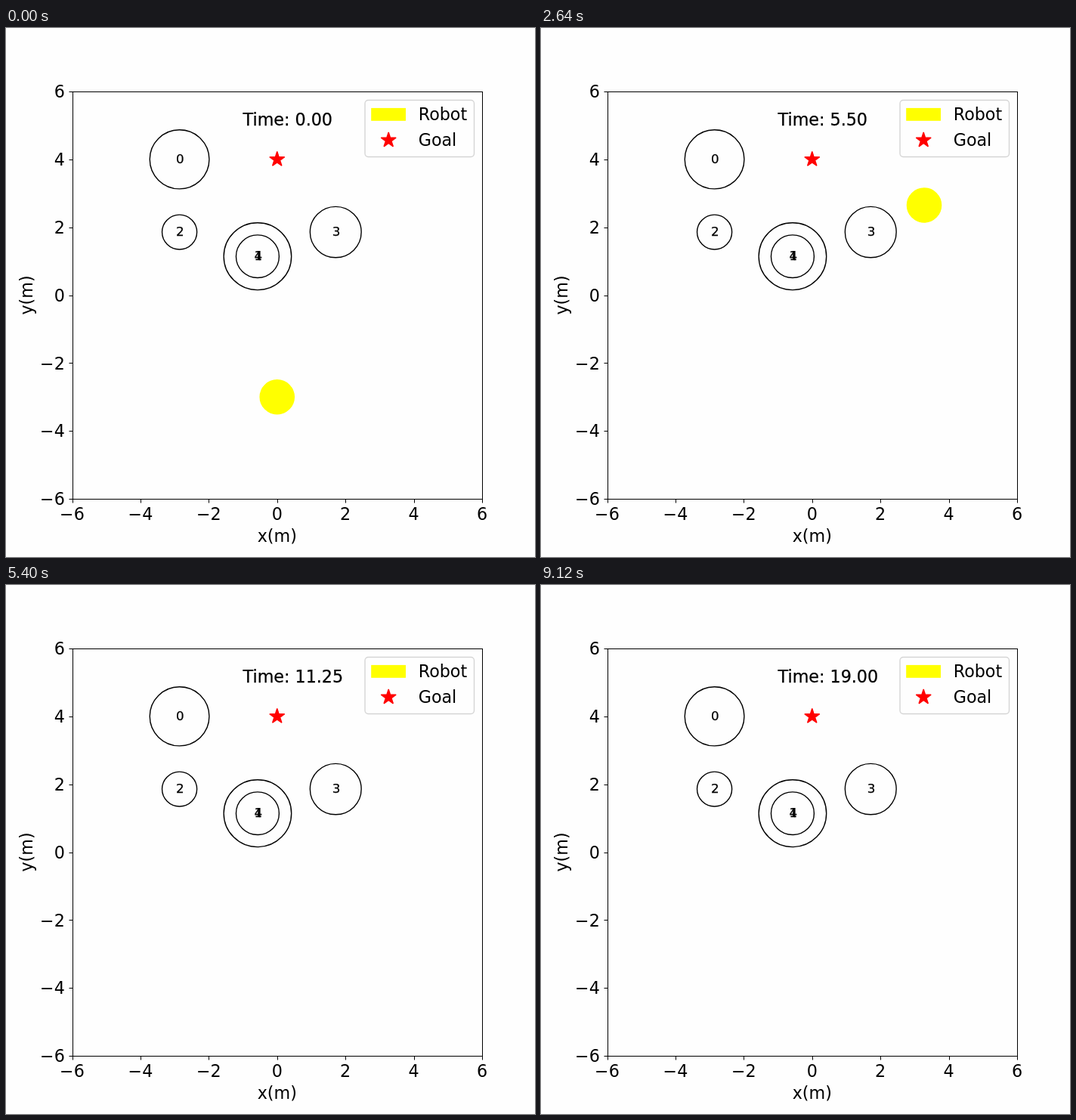
Animation of 700x700 px, one loop 9.24 s. Source, as an HTML page:

```html
<!DOCTYPE html>
<html lang="en">
<head>
<meta charset="utf-8">
<title>Robot path</title>
<style>
  html, body { margin: 0; width: 100%; height: 100%; overflow: hidden; background: #fefefe; }
  svg { display: block; width: 100vw; height: 100vh; }
  text { font: 22.22px "DejaVu Sans", sans-serif; white-space: pre; }
  .id { font-size: 16.67px; }
  .id, #clock { stroke: #000; stroke-width: .25; }
  .middle { text-anchor: middle; }
  .end { text-anchor: end; }
  .line { fill: none; stroke: #000; stroke-width: 1.39; }
  .axis { fill: none; stroke: #000; stroke-width: 1; }
  .yellow { fill: #ff0; stroke: #ff0; stroke-width: 1.39; }
  .star { fill: #f00; stroke: #f00; stroke-width: 1.39; stroke-linejoin: bevel; }
</style>
</head>
<body>
<svg viewBox="0 0 700 700">
  <clipPath id="area"><rect x="88" y="84" width="542" height="539"/></clipPath>
  <g clip-path="url(#area)"><ellipse id="robot" class="yellow" rx="22.6" ry="22.46"/></g>
  <g id="plot"></g>
  <text id="clock" x="313.6" y="129"></text>
  <g id="legend">
    <rect x="475" y="95.5" width="144.5" height="75" rx="4.4" fill="#fff" stroke="#ccc" stroke-width="1.39" opacity=".8"/>
    <rect class="yellow" x="483.9" y="106.6" width="44.4" height="15.5"/>
    <text x="545.7" y="122">Robot</text>
    <text x="545.7" y="156">Goal</text>
  </g>
</svg>
<script>
const STEP_MS = 120, STEPS = 77, STEP_TIME = 0.25;
const plot = document.getElementById('plot');
const robot = document.getElementById('robot');
const clock = document.getElementById('clock');
const SCALE_X = 542.5 / 12, SCALE_Y = 539 / 12;
const toX = x => 358.75 + x * SCALE_X;
const toY = y => 353.5 - y * SCALE_Y;

function add(parent, tag, attrs, text = '') {
  const node = document.createElementNS('http://www.w3.org/2000/svg', tag);
  for (const name in attrs) node.setAttribute(name, attrs[name]);
  node.textContent = text;
  parent.append(node);
}

function addStar(parent, x, y) {
  const points = Array.from({ length: 10 }, (_, i) => {
    const radius = i % 2 ? 3.98 : 10.42, angle = i * Math.PI / 5;
    return [x + radius * Math.sin(angle), y - radius * Math.cos(angle)];
  });
  add(parent, 'polygon', { class: 'star', points: points.join(' ') });
}

function drawPlot() {
  // Obstacles: x, y, radius in metres
  [
    [-20 / 7, 4, .87], [-4 / 7, 8 / 7, .99], [-20 / 7, 13 / 7, .51],
    [12 / 7, 13 / 7, .75], [-4 / 7, 8 / 7, .63]
  ].forEach(([x, y, r], id) => {
    add(plot, 'ellipse', { class: 'line', cx: toX(x), cy: toY(y), rx: r * SCALE_X, ry: r * SCALE_Y });
    add(plot, 'text', { class: 'id', x: toX(x - .1), y: toY(y - .1) + .5 }, id);
  });
  addStar(plot, toX(0), toY(4));

  add(plot, 'rect', { class: 'axis', x: 88.5, y: 84.5, width: 542, height: 539 });
  for (let v = -6; v <= 6; v += 2) {
    const label = String(v).replace('-', '\u2212');
    const x = Math.round(toX(v)) + .5, y = Math.round(toY(v)) + .5;
    add(plot, 'path', { class: 'axis', d: `M${x} 623.5v5M88.5 ${y}h-5` });
    add(plot, 'text', { class: 'middle', x: toX(v), y: 651 }, label);
    add(plot, 'text', { class: 'end', x: 77.8, y: toY(v) + 8.2 }, label);
  }
  add(plot, 'text', { class: 'middle', x: 358.75, y: 679.5 }, 'x(m)');
  add(plot, 'text', { class: 'middle', transform: 'translate(35 353.5) rotate(-90)' }, 'y(m)');
  addStar(document.getElementById('legend'), 506.2, 148.4);
}

// Robot waypoints: step, x, y
const path = [
  [0, 358.75, 488.25], [4, 364, 447], [7, 376.5, 403.5], [8, 387.5, 388],
  [16, 494.5, 323.5], [22, 507, 234.5], [24, 511.5, 219.5], [32, 578.5, 188.5],
  [34, 598, 184], [40, 640, 174], [45, 676, 166]
];

const slope = (i, axis) => (path[i + 1][axis] - path[i][axis]) / (path[i + 1][0] - path[i][0]);

function tangent(i, axis) {
  if (i === 0) return slope(0, axis);
  if (i === path.length - 1) return slope(i - 1, axis);
  const before = path[i][0] - path[i - 1][0], after = path[i + 1][0] - path[i][0];
  return (slope(i - 1, axis) * after + slope(i, axis) * before) / (before + after);
}

// Cubic Hermite position along the waypoints
function position(step, axis) {
  const s = Math.min(step, path[path.length - 1][0]);
  let i = 0;
  while (i < path.length - 2 && s >= path[i + 1][0]) i++;
  const span = path[i + 1][0] - path[i][0], u = (s - path[i][0]) / span, w = 1 - u;
  return w * w * (1 + 2 * u) * path[i][axis] + u * u * (3 - 2 * u) * path[i + 1][axis]
    + span * u * w * (w * tangent(i, axis) - u * tangent(i + 1, axis));
}

function render() {
  const step = Math.floor(performance.now() / STEP_MS) % STEPS;
  robot.setAttribute('cx', position(step, 1));
  robot.setAttribute('cy', position(step, 2));
  clock.textContent = `Time: ${(step * STEP_TIME).toFixed(2)}`;
  requestAnimationFrame(render);
}

drawPlot();
render();
</script>
</body>
</html>
```
